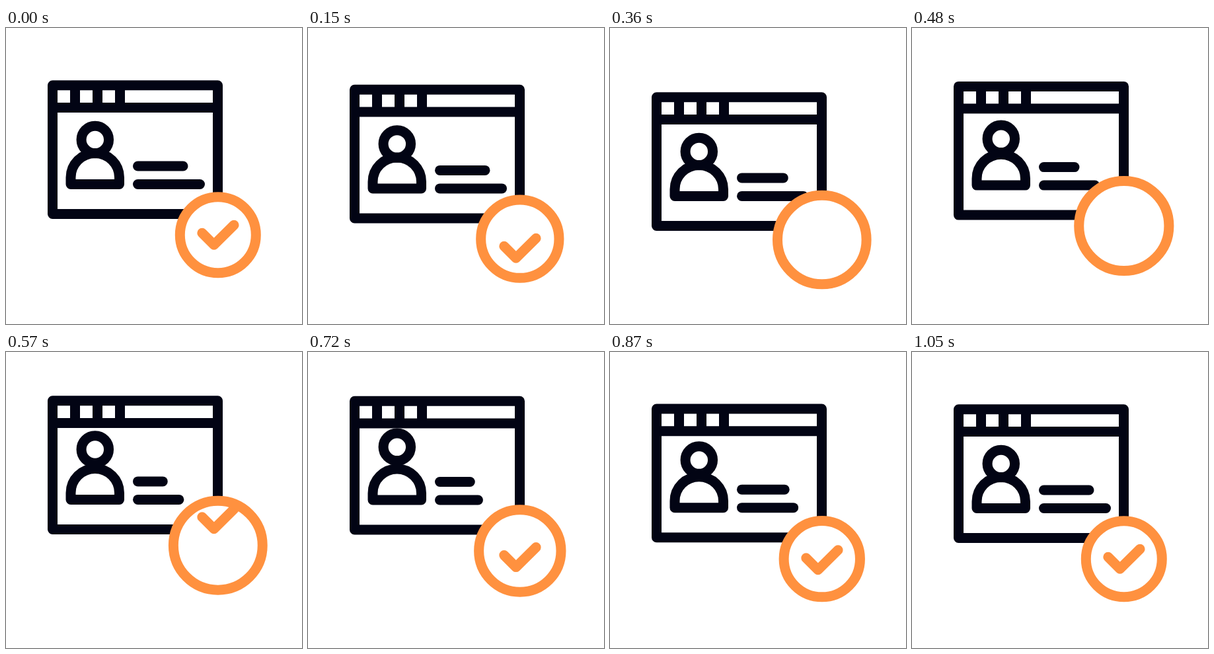
Recreate the animation shown at these times as an HTML page. Size 448x448 px, loop 1.17 s.

```html
<!DOCTYPE html>
<html lang="en">
<head>
<meta charset="utf-8">
<title>Verified profile</title>
<style>
  html, body { margin: 0; width: 100%; height: 100%; overflow: hidden; background: #fff; }
  svg { display: block; width: 100vw; height: 100vh; }
  g { fill: none; stroke-width: 15; stroke-linecap: round; stroke-linejoin: round; }
  #card { stroke: #020414; }
  #badge { stroke: #ff913f; }
</style>
</head>
<body>
<svg viewBox="0 0 448 448">
  <clipPath id="inside"><circle id="mask"/></clipPath>
  <g id="card">
    <path d="M70.5 86.8H320.5V281.5H70.5ZM70.5 120.5H320.5M104.5 87V120M138.5 87V120M172.5 87V120"/>
    <circle id="head" cx="134.8" cy="169" r="20.75"/>
    <path d="M98 236.5V226.3a36.75 36.75 0 0 1 73.5 0V236.5Z"/>
    <line id="line1" x1="199.5" y1="209" y2="209"/>
    <line id="line2" x1="199.5" y1="236.5" y2="236.5"/>
  </g>
  <g id="badge">
    <circle id="disc" fill="#fff" stroke="none"/>
    <g clip-path="url(#inside)"><path id="check" d="M-24 -3L-6 15L24.3 -15"/></g>
    <circle id="ring"/>
  </g>
</svg>
<script>
const LOOP = 1170, STEP = 30;
const $ = id => document.getElementById(id);

const soft = p => p * p * (3 - 2 * p);
const sharp = p => p * p * p * (p * (6 * p - 15) + 10);

// Each key: [time in ms, value, easing towards this key]
const tracks = {
  card:  [[30, 0], [330, 18.2, soft], [630, -15, sharp], [930, 0, sharp]],
  head:  [[390, 0], [690, -13, soft], [990, 0, soft]],
  line1: [[270, 268], [600, 236.5, soft], [945, 268, soft]],
  line2: [[330, 293.5], [660, 254.8, soft], [1035, 293.5, soft]],
  badge: [[30, 0], [270, 12, soft], [585, -20.5, sharp], [885, 0, sharp]],
  grow:  [[60, 0], [420, 10.6, soft], [510, 10.6, soft], [900, 0, soft]],
  check: [[60, 0], [420, 90, soft], [420, -90, soft], [450, -90, soft], [690, 10, soft], [930, 0, soft]]
};

function valueAt(keys, t) {
  const i = keys.findIndex(k => k[0] > t);
  if (i === 0) return keys[0][1];
  if (i < 0) return keys[keys.length - 1][1];
  const [t0, v0] = keys[i - 1], [t1, v1, ease] = keys[i];
  return v0 + (v1 - v0) * ease((t - t0) / (t1 - t0));
}

const move = (id, x, y) => $(id).setAttribute("transform", `translate(${x} ${y})`);

function draw(t) {
  const at = name => valueAt(tracks[name], t);
  move("card", 0, at("card"));
  move("head", 0, at("head"));
  $("line1").setAttribute("x2", at("line1"));
  $("line2").setAttribute("x2", at("line2"));

  const r = 57.5 + at("grow");
  move("badge", 320.8, 313.2 + at("badge"));
  $("ring").setAttribute("r", r);
  $("disc").setAttribute("r", r);
  $("mask").setAttribute("r", r + 7);
  move("check", 0, at("check"));
}

const start = performance.now();
function tick() {
  const t = (performance.now() - start) % LOOP;
  draw(Math.floor(t / STEP) * STEP);
  requestAnimationFrame(tick);
}
tick();
</script>
</body>
</html>
```
